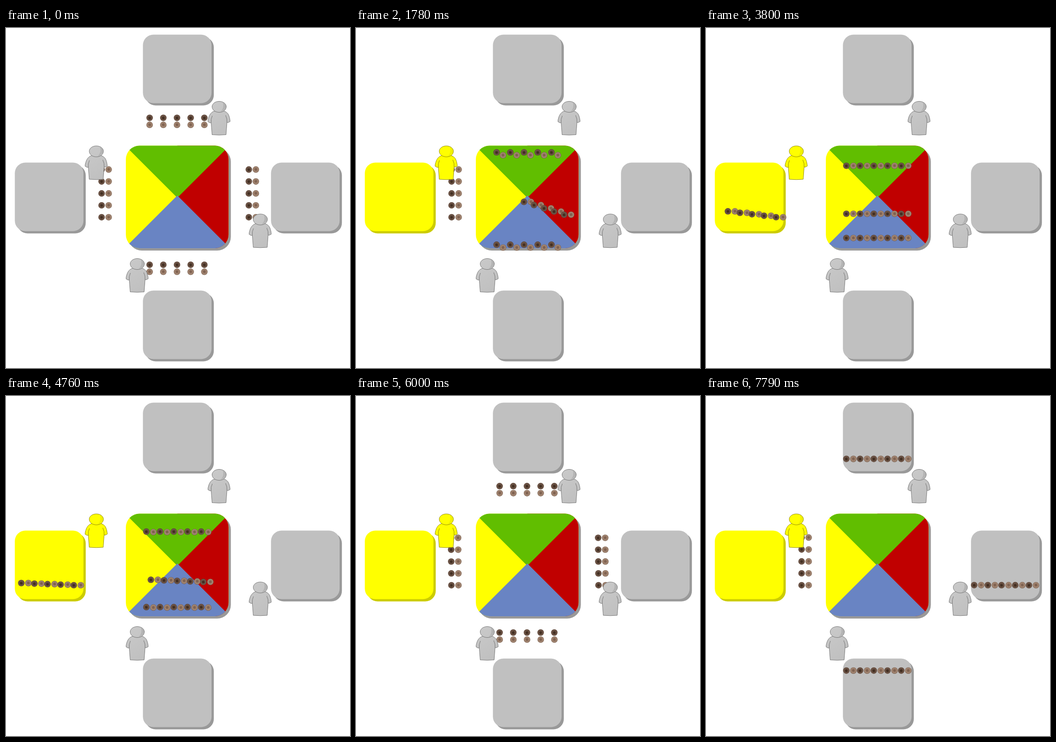
Animation, 752 px wide and 744 px high, one loop 8 s. Source, as an HTML page with a canvas:

```html
<!DOCTYPE html>
<html lang="en">
<head>
<meta charset="utf-8">
<title>Coin round</title>
<style>
html, body { margin: 0; width: 100%; height: 100%; overflow: hidden; background: #fff; }
canvas { display: block; }
</style>
</head>
<body>
<canvas id="stage" width="752" height="744"></canvas>
<script>
const ctx = document.getElementById('stage').getContext('2d');
const LOOP = 8000, ACTIVATE = 660, DURATION = 1500, LEAD = 14;
const CARD = 150, PAIR_GAP = 15.4;

// Each layout maps a pair index 0..4 to [centre x, centre y, pair angle].
const row = (x, y) => k => [x + 7.5 + 30 * k, y, 0];
const columnPairs = x => k => [x + 7.7, 309.7 + 26.1 * k, 0];
const rowPairs = y => k => [314 + 29.9 * k, y + 7.75, Math.PI / 2];

const leftHome = columnPairs(209), leftCard = row(25.5, 414);
const topHome = rowPairs(196.5), topPool = row(307, 301.5);
const rightHome = columnPairs(530.8), rightPool = row(307, 406.5);
const bottomHome = rowPairs(518), bottomPool = row(307, 459.5);

// One layout per stage of the round.
const players = [
  { card: [19.3, 294.6], figure: [172.5, 257.5], stages: [leftHome, leftHome, leftCard, leftHome, leftHome] },
  { card: [299.3, 14.6], figure: [441, 160], stages: [topHome, topPool, topPool, topHome, row(307, 137.5)] },
  { card: [579.3, 294.6], figure: [531, 406.5], stages: [rightHome, rightPool, rightPool, rightHome, row(586.5, 414)] },
  { card: [299.3, 574.6], figure: [262, 504], stages: [bottomHome, bottomPool, bottomPool, bottomHome, row(307, 601)] }
];

const moves = [
  { start: 1140, step: 80 },
  { start: 2930, step: 78.95 },
  { start: 4680, step: 77.9 },
  { start: 6390, step: 77.8 }
];

const GREY = { fill: '#c0c0c0', shadow: '#999', light: '#c8c8c8', dark: '#b4b4b4', line: '#6c6c6c' };
const YELLOW = { fill: '#ff0', shadow: '#cc0', light: '#ff0', dark: '#f0f000', line: '#857c00' };

// cubic-bezier(.25, .1, .25, 1)
function ease(t) {
  if (t <= 0) return 0;
  if (t >= 1) return 1;
  const bezier = (s, a, b) => 3 * (1 - s) ** 2 * s * a + 3 * (1 - s) * s * s * b + s ** 3;
  let lo = 0, hi = 1;
  for (let k = 0; k < 24; k++) {
    const mid = (lo + hi) / 2;
    if (bezier(mid, .25, .25) < t) lo = mid; else hi = mid;
  }
  return bezier(lo, .1, 1);
}

// Motion advances in short held steps.
function progress(move, t) {
  if (t < move.start) return 0;
  const held = Math.floor((t - move.start) / move.step + .1) * move.step;
  return ease((held + LEAD) / DURATION);
}

function roundedRect(x, y, w, h, r, fill) {
  ctx.beginPath();
  ctx.roundRect(x, y, w, h, r);
  ctx.fillStyle = fill;
  ctx.fill();
}

function drawCard([x, y], colors) {
  roundedRect(x + 5, y + 5, CARD, CARD, 23, colors.shadow);
  roundedRect(x, y, CARD, CARD, 23, colors.fill);
}

function drawPool() {
  const x = 262, y = 257.5, size = 224.5, reach = 120, overlap = 2.5;
  roundedRect(x + 5, y + 5, size, size, 30, '#999');
  ctx.save();
  roundedRect(x, y, size, size, 30, '#ff0');
  ctx.clip();
  ctx.translate(374.5, 369);
  ctx.fillStyle = '#c00000';
  ctx.fillRect(0, -reach, reach, 2 * reach);
  // The green and blue wedges reach slightly past the middle.
  for (const [side, color] of [[-1, '#61be00'], [1, '#6984c3']]) {
    ctx.beginPath();
    ctx.moveTo(0, -side * overlap);
    ctx.lineTo(-reach, side * (reach - overlap));
    ctx.lineTo(reach, side * (reach - overlap));
    ctx.fillStyle = color;
    ctx.fill();
  }
  ctx.restore();
}

function disc(x, y, r, fill) {
  ctx.beginPath();
  ctx.arc(x, y, r, 0, 2 * Math.PI);
  ctx.fillStyle = fill;
  ctx.fill();
}

function drawCoin(x, y, light) {
  const [rim, body, core, mark] = light
    ? ['#6f5646', '#a58874', '#8a6b59', '#6a5040']
    : ['#553e2f', '#70574a', '#4d3728', '#2c1d13'];
  const shade = ctx.createRadialGradient(x, y + (light ? -1 : 1), 1, x, y, 7.1);
  shade.addColorStop(0, core);
  shade.addColorStop(.75, body);
  shade.addColorStop(1, rim);
  disc(x, y, 7.1, shade);
  for (const [dx, dy] of [[-1.6, -1], [1, -1.6], [-1, 1.4], [1.5, 1]]) disc(x + dx, y + dy, .9, mark);
}

const torso = new Path2D('M14 22 C8 24 4 29 2 36 Q0 42 .5 45 Q4 48 7.5 47.5 L9.5 73.5 Q25 75 40 73.5 L42 47 Q46 47 49 44.5 Q48 34 44.5 28 Q41 23 35 21.5 Z');
const armLines = new Path2D('M7.5 47.5 Q6.5 39 10 32 M42 47 Q43 39 39 31');
const head = new Path2D('M25 .5 C34 .5 40.5 6 40.5 12 C40.5 19 34 24.5 25 24.5 C16 24.5 9.5 19 9.5 12 C9.5 6 16 .5 25 .5 Z');
const headShade = new Path2D('M33 3 Q40 6 40 12 Q39 20 28 23.5 Q37 14 33 3 Z');

function drawFigure([x, y], colors) {
  ctx.save();
  ctx.translate(x, y);
  ctx.lineWidth = .9;
  ctx.strokeStyle = colors.line;
  const shade = ctx.createLinearGradient(8, 12, 42, 66);
  shade.addColorStop(0, colors.light);
  shade.addColorStop(1, colors.fill);
  for (const part of [torso, head]) {
    ctx.fillStyle = shade;
    ctx.fill(part);
    if (part === head) {
      ctx.fillStyle = colors.dark;
      ctx.fill(headShade);
    }
    ctx.stroke(part);
  }
  ctx.stroke(armLines);
  ctx.restore();
}

// Two touching coins, dark then light, that travel and turn together.
function drawPair(stages, k, amounts) {
  const [x, y, angle] = amounts.reduce((from, amount, m) => {
    const to = stages[m + 1](k);
    return from.map((v, j) => v + (to[j] - v) * amount);
  }, stages[0](k));
  const dx = Math.cos(angle) * PAIR_GAP / 2, dy = Math.sin(angle) * PAIR_GAP / 2;
  drawCoin(x - dx, y - dy, false);
  drawCoin(x + dx, y + dy, true);
}

function draw(t) {
  const colorsOf = k => k === 0 && t >= ACTIVATE ? YELLOW : GREY;
  const amounts = moves.map(move => progress(move, t));
  ctx.clearRect(0, 0, 752, 744);
  players.forEach((player, k) => drawCard(player.card, colorsOf(k)));
  drawPool();
  for (const { stages } of players) {
    for (let k = 0; k < 5; k++) drawPair(stages, k, amounts);
  }
  players.forEach((player, k) => drawFigure(player.figure, colorsOf(k)));
}

const began = performance.now();
function tick() {
  draw((performance.now() - began) % LOOP);
  requestAnimationFrame(tick);
}
tick();
</script>
</body>
</html>
```
